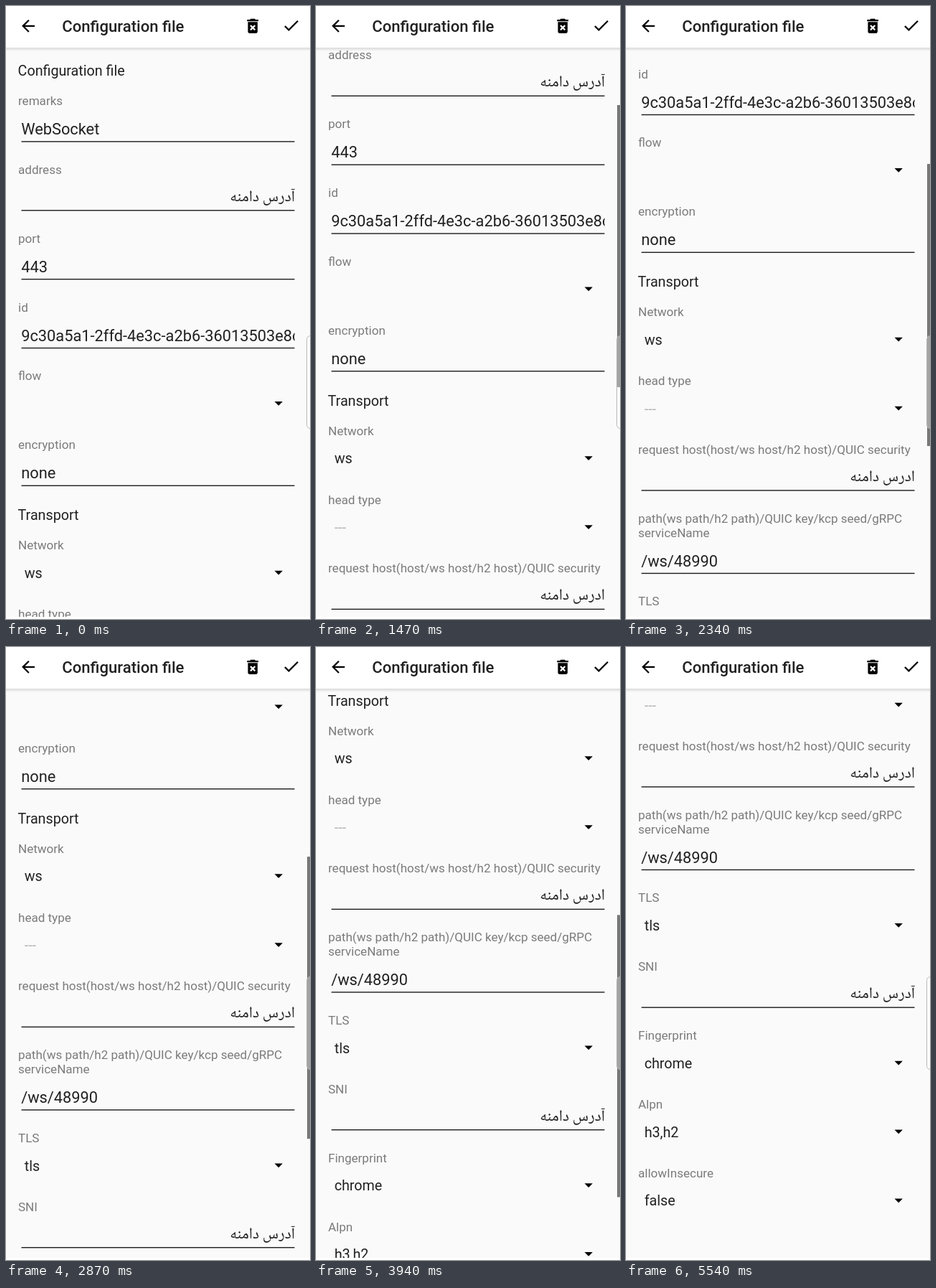
An HTML page that plays this animation: 424 px wide and 854 px high, repeating every 5.67 s.

```html
<!DOCTYPE html>
<html lang="en">
<head>
<meta charset="utf-8">
<title>Configuration file</title>
<style>
  html, body { margin: 0; width: 100%; height: 100%; overflow: hidden; background: #fff; }
  svg { display: block; width: 424px; height: 854px; }
  text { font-family: Roboto, "Noto Sans", sans-serif; fill: #212121; }
  .title { font-size: 22.1px; font-weight: 500; }
  .head { font-size: 19.7px; }
  .label { font-size: 17.06px; fill: #7b7b7b; }
  .value { font-size: 21.8px; }
  .rtl { font-family: "Noto Naskh Arabic", "DejaVu Sans", sans-serif; font-size: 22px; text-anchor: end; }
  .pick { font-size: 19.7px; }
  .empty { font-size: 19.7px; fill: #b4b4b4; }
  .line { fill: #1c1c1c; }
</style>
</head>
<body>
<svg viewBox="0 0 424 854">
  <defs>
    <clipPath id="page"><rect y="58" width="424" height="793"/></clipPath>
    <clipPath id="field"><rect x="20" width="382.6" height="1700"/></clipPath>
    <linearGradient id="shade" x2="0" y2="1">
      <stop offset="0" stop-color="#000" stop-opacity=".13"/>
      <stop offset="1" stop-color="#000" stop-opacity="0"/>
    </linearGradient>
  </defs>

  <rect width="424" height="851" fill="#fafafa"/>
  <g clip-path="url(#page)"><g id="form"></g></g>

  <rect width="424" height="58" fill="#fff"/>
  <rect y="58" width="424" height="5" fill="url(#shade)"/>
  <path transform="translate(17.6 14.4) scale(1.12)" d="M20 11H7.83l5.59-5.59L12 4l-8 8 8 8 1.41-1.41L7.83 13H20z"/>
  <text class="title" x="78.3" y="36">Configuration file</text>
  <path transform="translate(330.7 14.5) scale(1.12)" d="M6 19c0 1.1.9 2 2 2h8c1.1 0 2-.9 2-2V7H6zm2.46-7.12l1.41-1.41L12 12.59l2.12-2.12 1.41 1.41L13.41 14l2.12 2.12-1.41 1.41L12 15.41l-2.12 2.12-1.41-1.41L10.59 14zM15.5 4l-1-1h-5l-1 1H5v2h14V4z"/>
  <path transform="translate(384.3 13.7) scale(1.12)" d="M9 16.17L4.83 12l-1.42 1.41L9 19 21 7l-1.41-1.41z"/>

  <rect id="bar" x="420" width="4" height="393" fill="#777"/>
  <rect x="419.5" y="459.5" width="12" height="129" rx="5" fill="#fff" fill-opacity=".32" stroke="#b8b8b8"/>
</svg>

<script>
const FRAME = 1000 / 15, COUNT = 85, PITCH = 95.87;
const form = document.getElementById('form');
const bar = document.getElementById('bar');

function add(tag, attrs, content = '') {
  const el = document.createElementNS('http://www.w3.org/2000/svg', tag);
  for (const name in attrs) el.setAttribute(name, attrs[name]);
  el.textContent = content;
  form.append(el);
}
const text = (cls, x, y, str) => add('text', { class: cls, x, y }, str);

let y = 138; // baseline of the next label

function heading(str) {
  text('head', 16.6, y - 41.1, str);
}

function label(str) {
  str.split('\n').forEach((part, i) => {
    if (i) y += 19.7;
    text('label', 17, y, part);
  });
}

function field(name, str) {
  label(name);
  if (/[\u0600-\u06ff]/.test(str)) text('rtl', 403, y + 38, str);
  else add('text', { class: 'value', x: 21.2, y: y + 41, 'clip-path': 'url(#field)' }, str);
  add('rect', { class: 'line', x: 21.5, y: y + 50.2, width: 381, height: 1.4 });
  y += PITCH;
}

function picker(name, str) {
  label(name);
  text(str === '---' ? 'empty' : 'pick', 25.7, y + 39.6, str);
  add('path', { d: `M374.5 ${y + 29.6}h11.4l-5.7 5.7z` });
  y += PITCH;
}

heading('Configuration file');
field('remarks', 'WebSocket');
field('address', 'آدرس دامنه');
field('port', '443');
field('id', '9c30a5a1-2ffd-4e3c-a2b6-36013503e8c');
picker('flow', '');
field('encryption', 'none');
y += 44;
heading('Transport');
picker('Network', 'ws');
picker('head type', '---');
field('request host(host/ws host/h2 host)/QUIC security', 'ادرس دامنه');
field('path(ws path/h2 path)/QUIC key/kcp seed/gRPC\nserviceName', '/ws/48990');
picker('TLS', 'tls');
field('SNI', 'آدرس دامنه');
picker('Fingerprint', 'chrome');
picker('Alpn', 'h3,h2');
picker('allowInsecure', 'false');

// Scroll offset at given ticks: three drags with rests between
const keys = [[7, 0], [13, 47], [30, 268], [35, 325], [37, 325], [43, 470.5],
              [48, 520], [51, 520], [59, 634.5], [70, 795], [75, 805]];

const slope = i => (keys[i + 1][1] - keys[i][1]) / (keys[i + 1][0] - keys[i][0]);

function tangent(i) {
  if (i === 0 || i === keys.length - 1) return 0;
  const a = slope(i - 1), b = slope(i);
  return a * b > 0 ? 2 * a * b / (a + b) : 0;
}

// Monotone cubic through the keys
function offset(tick) {
  if (tick <= keys[0][0]) return 0;
  const i = keys.findIndex(k => k[0] > tick) - 1;
  if (i < 0) return keys[keys.length - 1][1];
  const [t0, p0] = keys[i], [t1, p1] = keys[i + 1];
  const d = t1 - t0, u = (tick - t0) / d, v = 1 - u;
  return p0 * (1 + 2 * u) * v * v + tangent(i) * d * u * v * v
       + p1 * u * u * (3 - 2 * u) - tangent(i + 1) * d * u * u * v;
}

function draw(now) {
  const tick = Math.floor((now + 4) / FRAME) % COUNT;
  const s = offset(tick);
  form.setAttribute('transform', `translate(0 ${-s})`);
  bar.setAttribute('y', 59 + s * 0.4955);
  bar.setAttribute('opacity', tick < 8 ? 0 : Math.max(0, Math.min(1, (83 - tick) / 5)));
}

let start;
function loop(now) {
  start ??= now;
  draw(now - start);
  requestAnimationFrame(loop);
}
draw(0);
requestAnimationFrame(loop);
</script>
</body>
</html>
```
